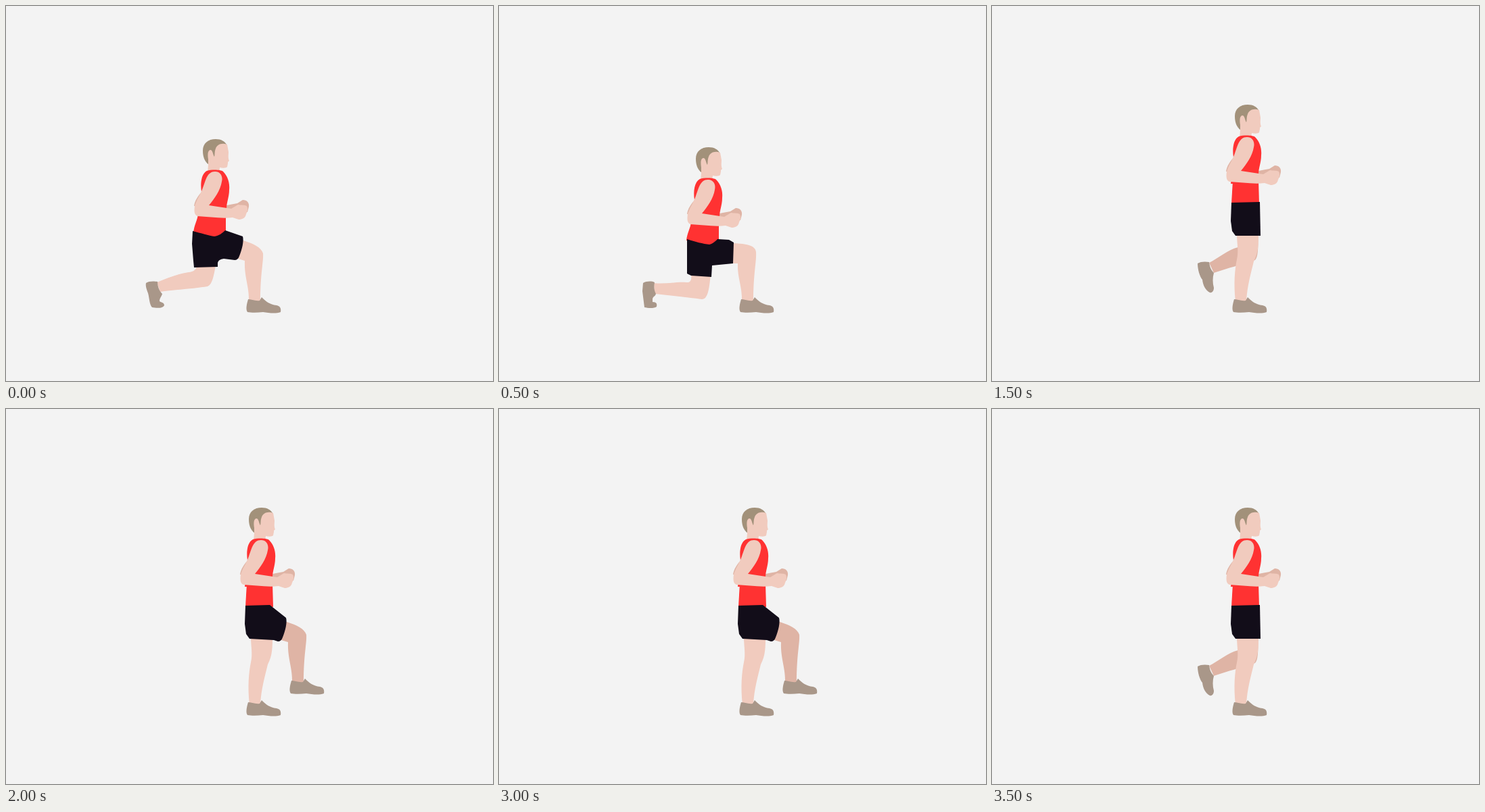
An HTML page that plays this animation: 720x555 px, repeating every 4 s.

```html
<!DOCTYPE html>
<html lang="en">
<head>
<meta charset="utf-8">
<title>Lunge and kick</title>
<style>
  html, body { margin: 0; width: 100%; height: 100%; overflow: hidden; background: #f3f3f3; }
  svg { display: block; width: 720px; height: 555px; }
</style>
</head>
<body>
<svg id="stage" viewBox="0 0 720 555"></svg>
<script>
const SKIN = '#f1cbbe', SHADE = '#dfb4a5', HAIR = '#a2917a', SHOE = '#a99789',
      RED = '#ff3232', BLACK = '#120d19';
const STEP = 500;

const path = (fill, d) => `<path fill="${fill}" d="${d}"/>`;
const move = (x, y, content) => `<g transform="translate(${x} ${y})">${content}</g>`;

const head =
  path(HAIR, 'M300 235C293 230 291 222 291 214C291 203 299 197 310 197C318 197 324 200 327 207L311 226Z') +
  path(SKIN, 'M327 205C319 202 312 205 310 211C308 216 309 220 308 223C306 221 306 213 302 213C298 214 298 220 299 227L299 235L298 247L315 247L316 239C320 240 326 240 327 238L328 233L328 231L330 229C328 225 329 220 329 216Z');

const farHand = path(SHADE, 'M322 296L331 294L342 292L350 287C356 287 360 291 359 297L357 305L343 304L322 301Z');

const shirt = path(RED, 'M297 244C304 242 317 242 321 245C328 252 331 262 330 272C330 283 326 290 326 300L325 314L285 314L289 275C287 262 289 248 297 244Z');

const arm =
  path(SHADE, 'M290 274C284 281 279 288 278 296L284 296L292 278Z') +
  path(SKIN, 'M309 245C317 245 321 252 319 260C317 273 308 285 300 295L333 300L343 294C348 295 353 294 356 296C358 300 357 304 355 308C354 314 349 316 344 316L335 313C320 315 300 312 283 311C278 309 278 303 279 296C281 288 288 278 291 269C295 259 297 245 309 245Z');

const torso = (x, y, waist) =>
  move(x, y, head + farHand + shirt) + path(RED, waist) + move(x, y, arm);

const leanTorso =
  move(53, -51, head) +
  path(SHADE, 'M385 244L398 240L413 231C419 231 422 235 422 240L420 250L405 250L385 249Z') +
  path(RED, 'M352 194C358 190 376 190 380 193C387 199 389 210 389 220L388 250L392 262L392 295L351 295L351 255L347 222C345 208 346 198 352 194Z') +
  path(SHADE, 'M346 226L340 244L344 246L350 226Z') +
  path(SKIN, 'M364 194C372 194 377 200 376 210C375 225 368 236 362 246L392 247L403 239C408 240 414 237 419 240C421 245 420 249 417 253C415 258 410 261 405 260L395 258C380 261 362 262 346 262C340 260 340 254 341 248C342 235 347 226 349 215C351 203 355 194 364 194Z');

const shoe = path(SHOE, 'M358 434C362 434 369 437 375 436L378 431C384 437 390 442 400 443C405 444 407 447 406 453C398 456 388 454 380 453C372 454 362 454 357 453C354 449 356 441 358 434Z');

const bentLeg = fill =>
  path(fill, 'M338 342L351 347C366 352 377 357 380 366C381 378 376 395 376 438L359 438C360 415 352 402 353 377L336 372Z') + shoe;

const standLeg =
  path(SKIN, 'M362 337L394 337C394 352 394 365 387 378C383 395 377 415 376 438L360 438C357 410 359 390 362 375C365 362 362 352 362 337Z') + shoe;

const halfLunge =
  path(SKIN, 'M281 380C284 388 279 393 270 394C255 396 240 402 223 409L228 423C250 420 280 418 298 415C305 412 307 400 310 384Z') +
  path(SHOE, 'M207 410C210 407 219 407 224 408C224 414 226 421 231 426C230 430 227 432 227 437C230 439 234 439 234 443C232 448 222 447 216 446C212 442 212 432 210 425C208 420 206 414 207 410Z') +
  bentLeg(SKIN) +
  torso(0, 0, 'M284 308L325 308L325 337L308 343L277 336C278 324 283 317 284 308Z') +
  path(BLACK, 'M276 333C288 336 300 340 308 341C315 340 320 336 324 332L350 341C352 348 349 360 345 370Q343 376 338 376L322 374Q314 375 313 380L313 386L278 387L277 377L275 352Z');

const deepLunge =
  path(SKIN, 'M284 396C285 404 284 410 277 409C262 408 245 412 229 410L230 426C250 428 285 432 300 434C309 434 311 418 313 396Z') +
  path(SHOE, 'M213 410C218 407 226 407 230 409C229 415 229 420 232 426C231 430 227 430 227 434L227 438C233 438 234 441 233 445C229 448 220 447 215 446C214 438 213 430 212 422Z') +
  path(SKIN, 'M335 348L347 351C366 352 379 354 380 364C381 378 376 395 376 438L359 438C360 415 352 402 353 381L335 381Z') + shoe +
  torso(0, 12, 'M284 320L325 320L325 349L311 355L277 347C278 336 283 329 284 320Z') +
  path(BLACK, 'M278 345C290 349 302 352 311 353C316 352 320 348 323 345L340 346L347 350L346 381L315 384L314 401L284 399L278 396Z');

const upright = torso(68, -51, 'M356 258L394 258L395 293L354 293Z');

const stand =
  path(SHADE, 'M393 338C394 360 393 372 389 376L382 378C372 382 348 388 328 395L321 380C335 373 348 361 364 357L380 338Z') +
  path(SHOE, 'M304 381C308 378 316 378 321 379C322 385 323 390 328 395C326 402 326 410 328 417C328 422 325 425 322 424C316 421 312 414 311 405C307 400 304 390 304 381Z') +
  standLeg + upright +
  path(BLACK, 'M354 291L396 290L397 340L360 340L355 333L353 318Z');

const raise =
  move(64, -32, bentLeg(SHADE)) + standLeg + upright +
  path(BLACK, 'M354 291L390 290L414 309C416 316 413 328 409 338Q407 344 402 344L396 342L360 340L355 333L353 318Z');

const kick =
  path(SHADE, 'M408 271C420 265 430 262 440 262C455 262 477 256 500 249L502 265C485 272 468 280 455 284C445 286 435 285 428 292L410 308Z') +
  path(SHOE, 'M499 249C503 243 502 232 504 226C506 222 511 221 513 225C517 230 517 240 517 248C519 255 520 262 518 269C514 271 506 270 500 267C500 264 502 260 502 258Z') +
  standLeg + leanTorso +
  path(BLACK, 'M351 293L372 293C383 292 390 287 392 275L402 270L412 269C414 278 415 295 414 304L405 317L398 322L396 342L359 342L355 333L351 320Z');

const poses = { halfLunge, deepLunge, stand, raise, kick };
const order = ['halfLunge', 'deepLunge', 'halfLunge', 'stand', 'raise', 'kick', 'raise', 'stand'];

const stage = document.getElementById('stage');
stage.innerHTML = Object.entries(poses)
  .map(([name, art]) => `<g id="${name}" visibility="hidden">${art}</g>`).join('');

const start = performance.now();
let shown = null;

function draw(now) {
  const t = Math.max(0, now - start);
  const next = document.getElementById(order[Math.floor(t / STEP) % order.length]);
  if (next !== shown) {
    if (shown) shown.setAttribute('visibility', 'hidden');
    next.setAttribute('visibility', 'visible');
    shown = next;
  }
  requestAnimationFrame(draw);
}
draw(start);
</script>
</body>
</html>
```
